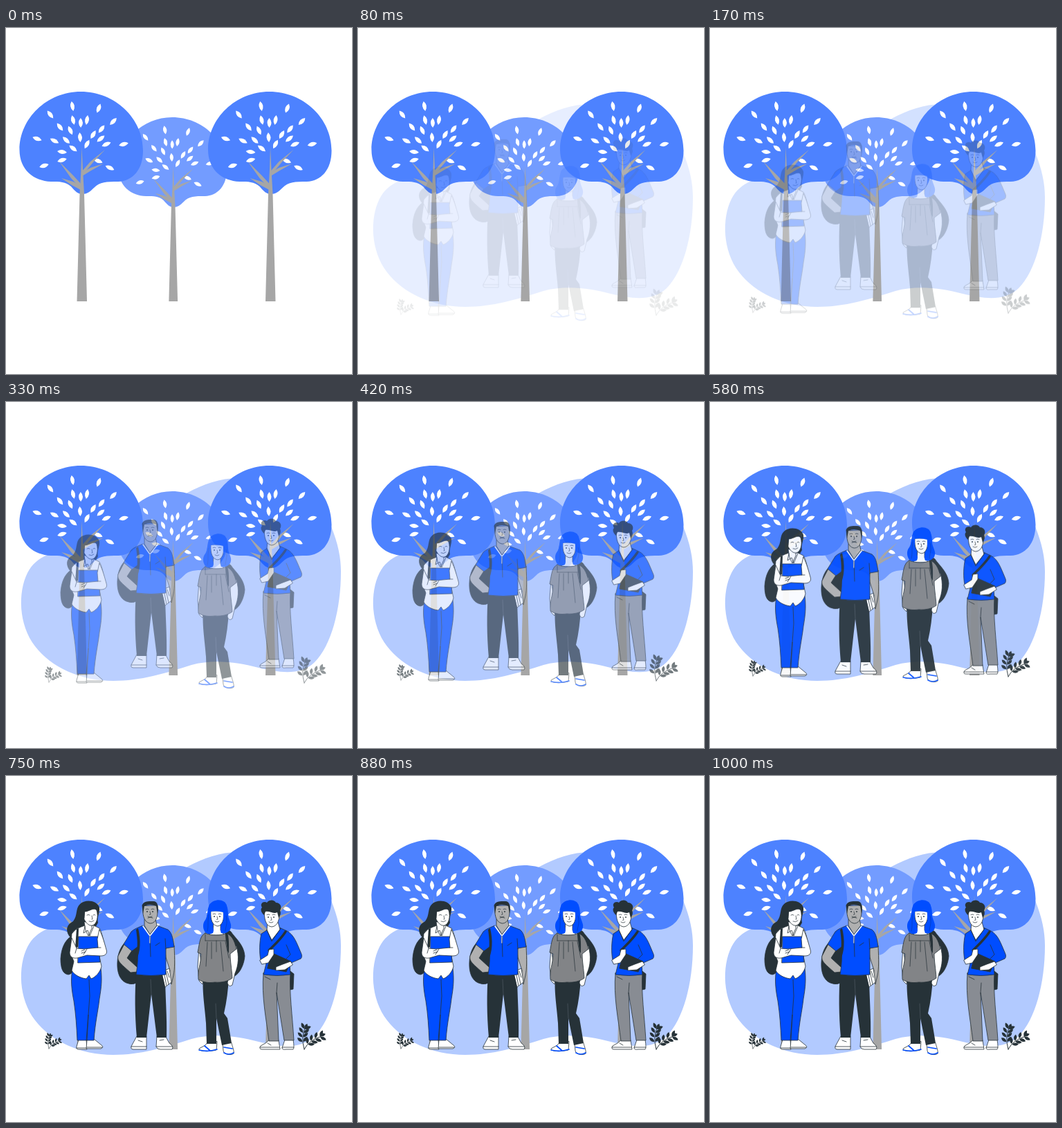
These frames come from a looping animation (500 px wide and 500 px high, 1040 ms). An HTML page with a canvas:

```html
<!DOCTYPE html>
<html lang="en">
<head>
<meta charset="utf-8">
<title>Students and trees</title>
<style>
html, body { margin: 0; width: 100%; height: 100%; overflow: hidden; background: #fff; }
canvas { display: block; width: 500px; height: 500px; }
</style>
</head>
<body>
<canvas id="stage" width="500" height="500"></canvas>
<script>
const LOOP = 1040, STEP = 1000 / 24;
const BLUE = '#004dff', DARK = '#263238', GREY = '#a6a6a6', SKIN = '#b0b0b0', WHITE = '#fff';
const BLOUSE = '#828487', SLACKS = '#888c93';
const ctx = document.getElementById('stage').getContext('2d');

function layer(draw) {
  const c = document.createElement('canvas');
  c.width = c.height = 500;
  const g = c.getContext('2d');
  g.lineCap = g.lineJoin = 'round';
  draw(g);
  return c;
}

function fill(g, color, d) {
  g.fillStyle = color;
  g.fill(new Path2D(d));
}

function line(g, d, color = DARK, width = 0.8) {
  g.strokeStyle = color;
  g.lineWidth = width;
  g.stroke(new Path2D(d));
}

function part(g, color, d) {
  fill(g, color, d);
  line(g, d);
}

function leaf(g, x, y, angle, len, wide) {
  g.save();
  g.translate(x, y);
  g.rotate(angle);
  g.beginPath();
  g.moveTo(-len / 2, 0);
  g.quadraticCurveTo(0, -wide, len / 2, 0);
  g.quadraticCurveTo(0, wide, -len / 2, 0);
  g.fill();
  g.restore();
}

const LEAVES = [
  [64, 125], [96, 113], [134, 116], [155, 135], [45, 160], [78, 143], [97, 133], [108, 137],
  [117, 133], [138, 146], [93, 148], [107, 158], [126, 154], [70, 163], [87, 162], [97, 174],
  [117, 168], [137, 160], [145, 168], [170, 168], [81, 179], [81, 191], [55, 199], [133, 192], [150, 202]
];

function tree(g, x, scale, color) {
  g.save();
  g.translate(x, 395);
  g.scale(scale, scale);
  g.translate(-109.5, -395);
  fill(g, color, 'M108 92C158 92 198 131 198 177C198 205 183 221 162 222C145 222 136 222 127 231C121 237 117 240 110 240C104 240 100 236 94 229C86 222 78 222 65 222C40 221 19.5 205 19.5 176C19.5 131 59 92 108 92Z');
  g.fillStyle = WHITE;
  for (const [lx, ly] of LEAVES) leaf(g, lx, ly, Math.atan2(ly - 183, lx - 109), 14, 6);
  fill(g, GREY, 'M109.5 172L111 205L113 240L117 395H102.5L106.5 240L108.5 205Z');
  fill(g, GREY, 'M109 208L122 193L143 176L126 194L111 212Z');
  fill(g, GREY, 'M110 209L122 202L141 196L123 206L110 214Z');
  fill(g, GREY, 'M109 226L97 213L77 193L94 217L108 232Z');
  fill(g, GREY, 'M107 227L97 222L80 217L95 227L108 234Z');
  g.restore();
}

function plant(g, x, y, scale) {
  g.save();
  g.translate(x, y);
  g.scale(scale, scale);
  g.fillStyle = DARK;
  for (const [cx, cy, ex, ey] of [[-5, -18, 1, -31], [6, -13, 25, -19]]) {
    line(g, `M0 0Q${cx} ${cy} ${ex} ${ey}`, DARK, 1);
    for (let s = 0.3; s < 0.95; s += 0.21) {
      const px = 2 * s * (1 - s) * cx + s * s * ex, py = 2 * s * (1 - s) * cy + s * s * ey;
      const a = Math.atan2((1 - s) * cy + s * (ey - cy), (1 - s) * cx + s * (ex - cx));
      for (const side of [-1, 1]) {
        const b = a + side * 0.8;
        leaf(g, px + Math.cos(b) * 5.5, py + Math.sin(b) * 5.5, b, 9.5, 4.4);
      }
    }
    leaf(g, ex + 1.5, ey - 2, Math.atan2(ey - cy, ex - cx), 9, 4.4);
  }
  g.restore();
}

// Eyes, nose and smile placed around the middle of a face.
function face(g, x, y) {
  g.fillStyle = DARK;
  for (const dx of [-4, 4]) {
    g.beginPath();
    g.arc(x + dx, y, 0.9, 0, 7);
    g.fill();
    line(g, `M${x + dx - 2} ${y - 3.5}q2 -1.2 4 0`, DARK, 0.7);
  }
  line(g, `M${x} ${y}l1 4l-1.5 .4M${x - 3} ${y + 7}q3 2.5 6 0`, DARK, 0.7);
}

function bookGirl(g) {
  part(g, DARK, 'M95 231C84 238 80 250 79 264C79 278 82 286 90 287C97 286 100 278 102 268L104 228Z');
  part(g, WHITE, 'M105 381L102 391Q101 395 105 395H117L116 381Z');
  part(g, WHITE, 'M117 381L116 394H137Q142 392 138 389L127 380Z');
  line(g, 'M102 393H116M117 392H139');
  part(g, BLUE, 'M96 279C93 294 95 310 98 325C101 345 102 362 103 382H117L119 345L116 382H127C129 355 133 340 135 322C138 305 139 293 137 278Z');
  line(g, 'M119 345L121 318L120 294');
  fill(g, DARK, 'M107 185C114 178 131 179 135 190C136 198 131 204 133 212L129 219C122 226 112 220 106 225C102 234 95 236 91 231C85 221 89 214 97 210C104 201 100 191 107 185Z');
  part(g, WHITE, 'M106 219L114 216H127L135 220C139 227 140 235 142 242L133 252L138 275C136 284 129 291 123 293L120 288L116 293C108 292 99 288 95 281L98 268L93 255L95 228Q100 221 106 219Z');
  part(g, WHITE, 'M113 211L115 223L119 231L124 220V212Z');
  part(g, WHITE, 'M114 196C120 196 127 189 131 194C134 204 131 214 125 216C119 217 115 211 113 207Z');
  line(g, 'M117 201q2 -1.5 4 0M126 201q2 -1.5 3 0M124 202l1 5h-1M120 210q4 2 7 -1', DARK, 0.7);
  line(g, 'M114 217L112 227L118 223L121 231L127 217');
  fill(g, DARK, 'M102 221L105 220L104 247L100 249Z');
  part(g, BLUE, 'M105 232H133L136 269L104 270Z');
  part(g, WHITE, 'M135 222C140 232 143 244 145 251C147 257 143 260 137 260L117 259L103 263C96 264 92 261 92 255L95 234L102 249L112 250L133 248L132 236Z');
  line(g, 'M102 249L100 256M117 250L112 258M132 248L137 248M114 251l-5 2M115 254l-6 2');
}

function blueGirl(g) {
  part(g, DARK, 'M318 220L325 225C331 234 344 244 345 260C344 274 336 289 327 290L319 260Z');
  part(g, WHITE, 'M292 384L288 389L279 394C279 399 296 398 304 396L305 384Z');
  part(g, WHITE, 'M313 386L314 397C315 403 326 404 329 401C330 397 327 391 326 386Z');
  line(g, 'M279 396Q292 399 305 395M287 390L294 396', BLUE, 1.7);
  line(g, 'M315 400Q322 404 329 400M315 392L327 394', BLUE, 1.7);
  part(g, WHITE, 'M279 248L277 276L279 296L284 301L285 292Z');
  fill(g, DARK, 'M285 292C283 310 288 340 289 357L290 387H304L304 350L312 389L326 386L320 350L315 343C319 326 321 308 322 292Z');
  line(g, 'M304 350L303 329', '#56616a', 0.6);
  part(g, WHITE, 'M321 242L333 246C337 260 336 274 331 285L327 302Q322 306 320 299L323 281Z');
  fill(g, BLUE, 'M294 186C302 176 316 178 319 187L322 215L313 226H292L288 213Z');
  part(g, WHITE, 'M300 212L299 224L293 230H316L310 223V213Z');
  part(g, BLOUSE, 'M288 227C280 231 280 240 277 255L282 257C281 273 277 281 278 294C286 299 294 299 302 298C312 299 322 296 327 292C326 277 324 268 324 257L333 250C330 237 326 230 318 227C312 231 296 231 288 227Z');
  line(g, 'M288 238H318M288 229V238M318 229V238M291 240L289 275M297 240V264M310 240L314 282M317 239L322 263M304 238V254', DARK, 0.7);
  fill(g, DARK, 'M316 222L319 223C323 234 322 246 322 256L320 253Z');
  part(g, WHITE, 'M296 195H314C316 208 312 216 306 217C299 216 295 209 296 195Z');
  fill(g, BLUE, 'M294 186C290 194 292 202 288 208C283 214 285 222 288 226Q293 230 299 227C302 221 297 215 296 208L296 196Q304 194 314 197L314 210C310 217 309 223 311 227Q319 229 324 222C328 214 321 208 321 201C321 190 319 180 306 180Q298 180 294 186Z');
  face(g, 305, 203);
  line(g, 'M293 200C291 211 293 216 291 224M318 202C321 213 317 218 317 224', '#0737a8', 0.6);
}

function bookBoy(g) {
  part(g, DARK, 'M184 232C171 239 165 247 162 260C159 278 162 294 174 299Q186 304 194 294L195 238Z');
  part(g, WHITE, 'M189 376L183 387Q178 395 184 395H203V376Z');
  part(g, WHITE, 'M218 376L217 391Q218 395 223 395H240Q243 391 236 386L231 377Z');
  line(g, 'M181 391H203M217 391H240M191 382l6 2M222 382l6 -1');
  fill(g, DARK, 'M188 284H230C230 318 233 348 232 378H218L210 315L203 378H189C186 343 186 315 188 284Z');
  line(g, 'M210 315L209 294', '#56616a', 0.6);
  part(g, SKIN, 'M172 241L162 260C160 268 168 273 180 284L190 283Q194 278 188 275L175 263L186 246Z');
  part(g, SKIN, 'M230 246L243 245C244 267 244 278 242 288L239 301L235 295L237 281L231 262Z');
  part(g, WHITE, 'M225 283L236 278L239 298L230 305Z');
  line(g, 'M228 283L232 303M231 282L235 301M233 282l3 9');
  part(g, BLUE, 'M198 216C191 219 185 221 181 225L170 243L182 253L190 247C191 262 190 275 188 287Q210 290 231 287L231 249L243 247C241 232 239 226 234 222L218 216L208 229Z');
  fill(g, DARK, 'M188 222L191 220C195 237 195 254 187 269L184 267C192 251 190 238 188 222Z');
  part(g, SKIN, 'M200 207V216L208 229L218 216L216 207Z');
  line(g, 'M198 217L208 231L219 217M208 231V241', WHITE, 1.5);
  line(g, 'M208 231L209 261M230 235L231 250M216 245L222 241');
  part(g, SKIN, 'M198 188C197 198 198 211 208 213C218 213 220 201 219 187Z');
  fill(g, DARK, 'M198 199L196.5 187C199 180 207 181 213 181C219 181 221 188 219 199L217 188Q208 184 200 188Z');
  face(g, 208, 196);
  line(g, 'M205 205Q208 203 212 205', DARK, 0.8);
}

function bagBoy(g) {
  part(g, WHITE, 'M381 381L375 386L368 390Q365 395 370 395H396L394 382Z');
  part(g, WHITE, 'M403 381L399 393Q399 396 405 395H415Q417 393 415 381Z');
  line(g, 'M367 392H395M399 392H416M378 386l5 3');
  part(g, DARK, 'M407 279L416 286L415 308L410 309Z');
  part(g, SLACKS, 'M372 285H411C409 311 414 348 416 382H402L391 313L394 383H380C376 350 369 318 372 285Z');
  line(g, 'M391 313L392 299M374 290l8 4');
  part(g, BLUE, 'M378 222L369 228C366 240 366 256 368 266L376 271L372 287Q392 290 411 287L410 271L426 264Q429 261 426 255C420 241 416 229 406 224L395 219Z');
  part(g, WHITE, 'M378 211L377 223L384 237L396 222L393 211Z');
  line(g, 'M377 222L384 239L397 220M405 244L411 258L404 265');
  line(g, 'M404 225C397 236 389 243 380 252', DARK, 3.4);
  part(g, DARK, 'M383 255L412 268L405 283L378 278Z');
  part(g, WHITE, 'M367 266L378 259L380 251L387 250L387 258L379 270L370 272Z');
  part(g, WHITE, 'M411 268L400 272L390 276L390 281L403 280L414 273Z');
  part(g, WHITE, 'M373 193C373 206 375 217 384 218C393 217 396 207 395 193Z');
  fill(g, DARK, 'M373 201C369 198 367 192 370 190C366 184 373 180 377 183C381 178 388 179 390 183C397 183 399 190 396 194C398 199 396 202 394 205L392 197C386 200 382 195 375 196Z');
  face(g, 383, 204);
}

const backdrop = layer(g => fill(g, '#b2caff', 'M60 221C120 212 160 215 200 175C235 145 285 110 335 110C400 106 452 130 470 180C480 205 484 225 484 245C484 300 470 352 446 376C425 396 395 391 365 384C335 376 300 371 268 380C230 392 195 403 155 403C107 403 65 383 42 353C18 322 17 275 31 247C37 235 47 226 60 221Z'));
const trees = layer(g => {
  tree(g, 241.5, 0.878, '#739cff');
  tree(g, 109.5, 1, '#4d82ff');
  tree(g, 382, 1, '#4d82ff');
});
const rising = layer(g => {
  plant(g, 431, 395, 1);
  plant(g, 62, 394, 0.6);
  bookGirl(g);
  blueGirl(g);
});
const falling = layer(g => {
  bookBoy(g);
  bagBoy(g);
});

const clamp = v => Math.min(1, Math.max(0, v));

function put(image, alpha, dy = 0) {
  ctx.globalAlpha = alpha;
  ctx.drawImage(image, 0, dy);
}

function render(ms) {
  const t = Math.floor((ms % LOOP + 5) / STEP) * STEP;
  const p = clamp((t - 20) / 615);
  const shift = 22.5 * (1 - p);
  ctx.globalAlpha = 1;
  ctx.fillStyle = WHITE;
  ctx.fillRect(0, 0, 500, 500);
  put(backdrop, 1 - (1 - clamp(t / 500)) ** 2);
  put(trees, 1);
  put(falling, p, -shift);
  put(rising, p, shift);
}

const start = performance.now();
function tick(now) {
  render(Math.max(0, now - start));
  requestAnimationFrame(tick);
}
render(0);
requestAnimationFrame(tick);
</script>
</body>
</html>
```
